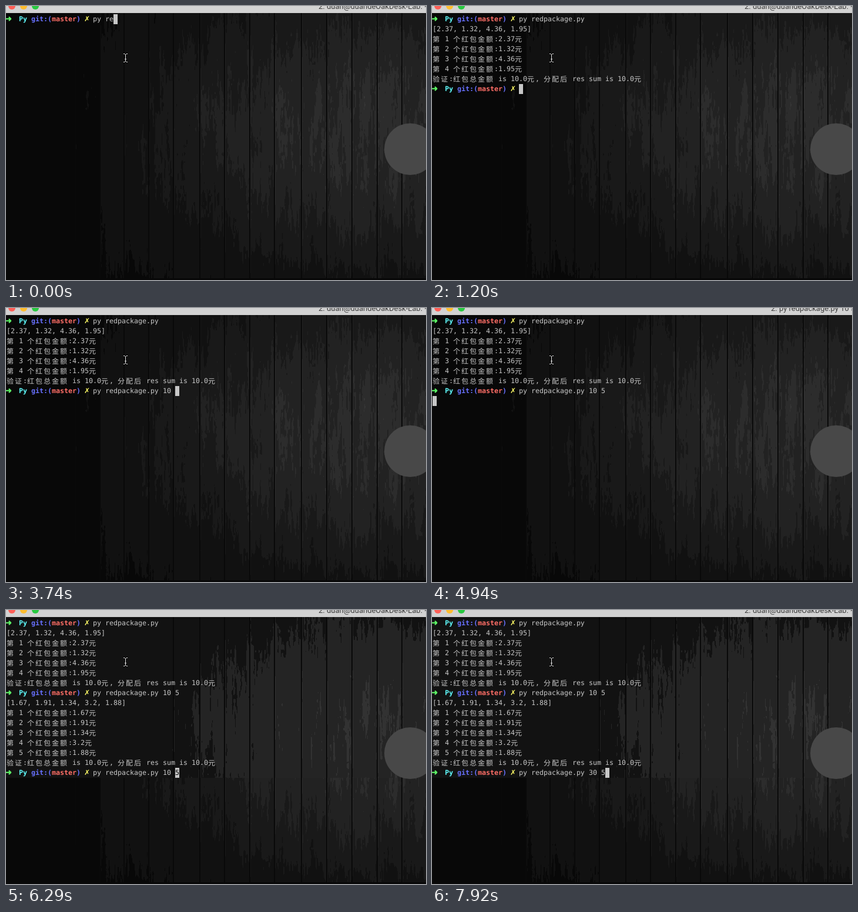
An HTML page with a canvas for the animation above (8000 ms loop, 715 by 467 pixels).

```html
<!DOCTYPE html>
<html lang="zh">
<head>
<meta charset="utf-8">
<title>Terminal</title>
<style>
  html, body { margin: 0; width: 100%; height: 100%; overflow: hidden; background: #080808; }
  #stage { position: relative; width: 715px; height: 467px; overflow: hidden; }
  #stage > * { position: absolute; }
  canvas { left: 0; top: 0; }
  #bar { left: 0; top: 0; width: 715px; height: 12px; background: #d2d2d2; overflow: hidden; }
  #bar i { position: absolute; top: -6px; width: 12px; height: 12px; border-radius: 50%; }
  #title { position: absolute; top: -7px; font: 13px/16px Roboto, Inter, sans-serif; color: #3c3c3c; white-space: pre; }
  #emblem { left: 644px; top: 200px; width: 88px; height: 88px; border-radius: 50%; background: #484848; }
  #term { left: 1px; top: 14px; color: #c7c7c7; font: 11.627px/17px "DejaVu Sans Mono", monospace; text-rendering: geometricPrecision; }
  #term span { position: absolute; height: 17px; white-space: pre; }
  #term .han { font: 12px/17px "Noto Sans CJK SC", "Noto Sans CJK", sans-serif; letter-spacing: 2px; }
  #term .sym { font: bold 12px/17px "DejaVu Sans", sans-serif; margin-left: -1px; }
  #term .arrow { font-size: 13px; margin-left: -2px; -webkit-text-stroke: 0.7px; }
  #cursor { width: 7px; height: 17px; background: #c7c7c7; color: #000; position: absolute; white-space: pre; }
  #mouse { left: 198px; top: 80px; }
</style>
</head>
<body>
<div id="stage">
  <canvas id="wood" width="715" height="467"></canvas>
  <canvas id="flat" width="715" height="286"></canvas>
  <div id="emblem"></div>
  <div id="bar">
    <i style="left:4px;background:#ff5f57"></i>
    <i style="left:24px;background:#ffbd2e"></i>
    <i style="left:44px;background:#28c940"></i>
    <span id="title"></span>
  </div>
  <div id="term"></div>
  <svg id="mouse" width="11" height="17" fill="none">
    <defs><path id="beam" d="M2 1.5H4L5.5 3L7 1.5H9M5.5 3V14M2 15.5H4L5.5 14L7 15.5H9M4 10.5H7"/></defs>
    <use href="#beam" stroke="#000" stroke-width="2.6"/>
    <use href="#beam" stroke="#eee"/>
  </svg>
</div>
<script>
const $ = id => document.getElementById(id);
const CELL = 7, ROW = 17;

// ---- wooden wallpaper ----
const gaps = [117, 159, 200, 242, 284, 329, 371, 414, 456, 502, 545, 588, 631, 673];

function rnd(x, y) {
  let h = Math.imul(x, 374761393) + Math.imul(y, 668265263) + 97;
  h = Math.imul(h ^ (h >>> 13), 1274126177);
  return ((h ^ (h >>> 16)) >>> 0) / 4294967296;
}

function noise(x, y) {
  const i = Math.floor(x), j = Math.floor(y);
  const ease = v => v * v * (3 - 2 * v);
  const u = ease(x - i), v = ease(y - j);
  const top = rnd(i, j) * (1 - u) + rnd(i + 1, j) * u;
  const low = rnd(i, j + 1) * (1 - u) + rnd(i + 1, j + 1) * u;
  return top * (1 - v) + low * v - 0.5;
}

// Brightness of the wood: a wide glow on the right, broken by upright grain.
function light(x, y) {
  const dx = (x - 620) / 370, dy = (y - 205) / 240;
  const glow = Math.exp(-dx * dx - dy * dy);
  const plank = gaps.filter(g => g <= x).length;
  const grain = 9 * noise(x / 2.5, y / 40) + 10 * noise(x / 13, y / 80 + plank * 7)
              + 6 * noise(x / 1.5, y / 7);
  const shade = x < 159 ? 5 : 0;
  const edge = gaps.includes(x - 2) ? 9 * glow : 0;
  return 9 + 33 * glow + grain * (0.25 + 0.75 * glow) - shade + edge;
}

function paint(canvas, levels, from) {
  const { width: w, height: h } = canvas, ctx = canvas.getContext('2d');
  const img = ctx.createImageData(w, h);
  for (let x = 0; x < w; x++) {
    const gap = x > from && gaps.some(g => x === g || x === g + 1);
    for (let y = 0; y < h; y++) {
      const v = light(x, y);
      let tone = levels.reduce((a, b) => Math.abs(b - v) < Math.abs(a - v) ? b : a);
      if (x <= from) tone = levels[0];
      if (gap && (x > 150 || (y > 85 && y < 400))) tone = 9;
      if (y > 463) tone = 8;
      const p = (y * w + x) * 4;
      img.data[p] = img.data[p + 1] = img.data[p + 2] = tone;
      img.data[p + 3] = 255;
    }
  }
  ctx.putImageData(img, 0, 0);
}

// ---- terminal text ----
const term = $('term');

function put(parent, row, col, text, cls = '', color = '') {
  const s = document.createElement('span');
  s.textContent = text;
  s.className = cls;
  s.style.left = col * CELL + 'px';
  s.style.top = row * ROW + 'px';
  if (color) { s.style.color = color; s.style.fontWeight = 'bold'; }
  parent.append(s);
}

// Places every word on the character grid; Han glyphs take two cells.
function write(parent, row, col, text) {
  for (const part of text.match(/\p{Script=Han}+|\s+|[^\s\p{Script=Han}]+/gu) || []) {
    const han = /\p{Script=Han}/u.test(part);
    if (part.trim()) put(parent, row, col, part, han ? 'han' : '');
    col += part.length * (han ? 2 : 1);
  }
}

function group() {
  const g = document.createElement('div');
  term.append(g);
  return g;
}

function prompt(g, row) {
  put(g, row, 0, '➜', 'sym arrow', '#5ffa68');
  put(g, row, 3, 'Py', '', '#60fdff');
  put(g, row, 6, 'git:(', '', '#6871ff');
  put(g, row, 11, 'master', '', '#ff6e67');
  put(g, row, 17, ')', '', '#6871ff');
  put(g, row, 19, '✗', 'sym', '#fffc67');
}

function output(g, row, parts) {
  write(g, row, 0, '[' + parts.join(', ') + ']');
  parts.forEach((p, i) => write(g, row + 1 + i, 0, `第 ${i + 1} 个红包金额:${p}元`));
  write(g, row + 1 + parts.length, 0, '验证:红包总金额 is 10.0元, 分配后 res sum is 10.0元');
}

const rows = [0, 7, 15];
const runs = [[], ['2.37', '1.32', '4.36', '1.95'], ['1.67', '1.91', '1.34', '3.2', '1.88']];
const blocks = rows.map((row, i) => {
  const g = group();
  if (i) output(g, rows[i - 1] + 1, runs[i]);
  prompt(g, row);
  return g;
});
const lines = rows.map(group);
const cursor = document.createElement('div');
cursor.id = 'cursor';
term.append(cursor);

// ---- timeline: time, prompt index, typed text, cursor steps back from the end ----
const cmd = 'py redpackage.py', RUN = -1;
const steps = [
  [0, 0, 'py re', 0],
  [150, 0, 'py red', 0],
  [300, 0, cmd + ' ', 0],
  [1200, 1, '', 0],
  [1950, 1, cmd, 0],
  [2700, 1, cmd + ' ', 0],
  [3140, 1, cmd + ' 1', 0],
  [3290, 1, cmd + ' 10', 0],
  [3740, 1, cmd + ' 10 ', 0],
  [4790, 1, cmd + ' 10 5', 0],
  [4940, 1, cmd + ' 10 5', RUN],
  [5090, 2, '', 0],
  [5690, 2, cmd + ' 10 5', 0],
  [6290, 2, cmd + ' 10 5', 1],
  [6440, 2, cmd + ' 10 5', 2],
  [6590, 2, cmd + ' 10 5', 3],
  [6880, 2, cmd + ' 0 5', 3],
  [7330, 2, cmd + ' 30 5', 3],
  [7630, 2, cmd + ' 30 5', 2],
  [7770, 2, cmd + ' 30 5', 1],
  [7920, 2, cmd + ' 30 5', 0]
];
const done = [cmd, cmd + ' 10 5'];

function show([, at, text, back]) {
  const running = back === RUN;
  blocks.forEach((g, i) => g.style.display = i <= at ? '' : 'none');
  lines.forEach((g, i) => {
    g.textContent = '';
    if (i <= at) write(g, rows[i], 21, i < at ? done[i] : text);
  });
  const pos = text.length - back;
  cursor.textContent = running ? '' : text[pos] || '';
  cursor.style.left = (running ? 0 : 21 + pos) * CELL + 'px';
  cursor.style.top = (rows[at] + (running ? 1 : 0)) * ROW + 'px';
  $('flat').style.display = at === 2 ? '' : 'none';
  $('title').textContent = running ? '2. py redpackage.py 10 5 (Python)' : '2. duan@duandeOakDesk-Lab: ~/Py';
  $('title').style.left = running ? '577px' : '532px';
}

let current;
function tick() {
  const t = performance.now() % 8000;
  const step = steps.filter(s => s[0] <= t).pop();
  if (step !== current) show(current = step);
  requestAnimationFrame(tick);
}

paint($('wood'), [8, 17, 25, 34, 44, 54], 0);
paint($('flat'), [18, 36, 50], 243);
tick();
</script>
</body>
</html>
```
